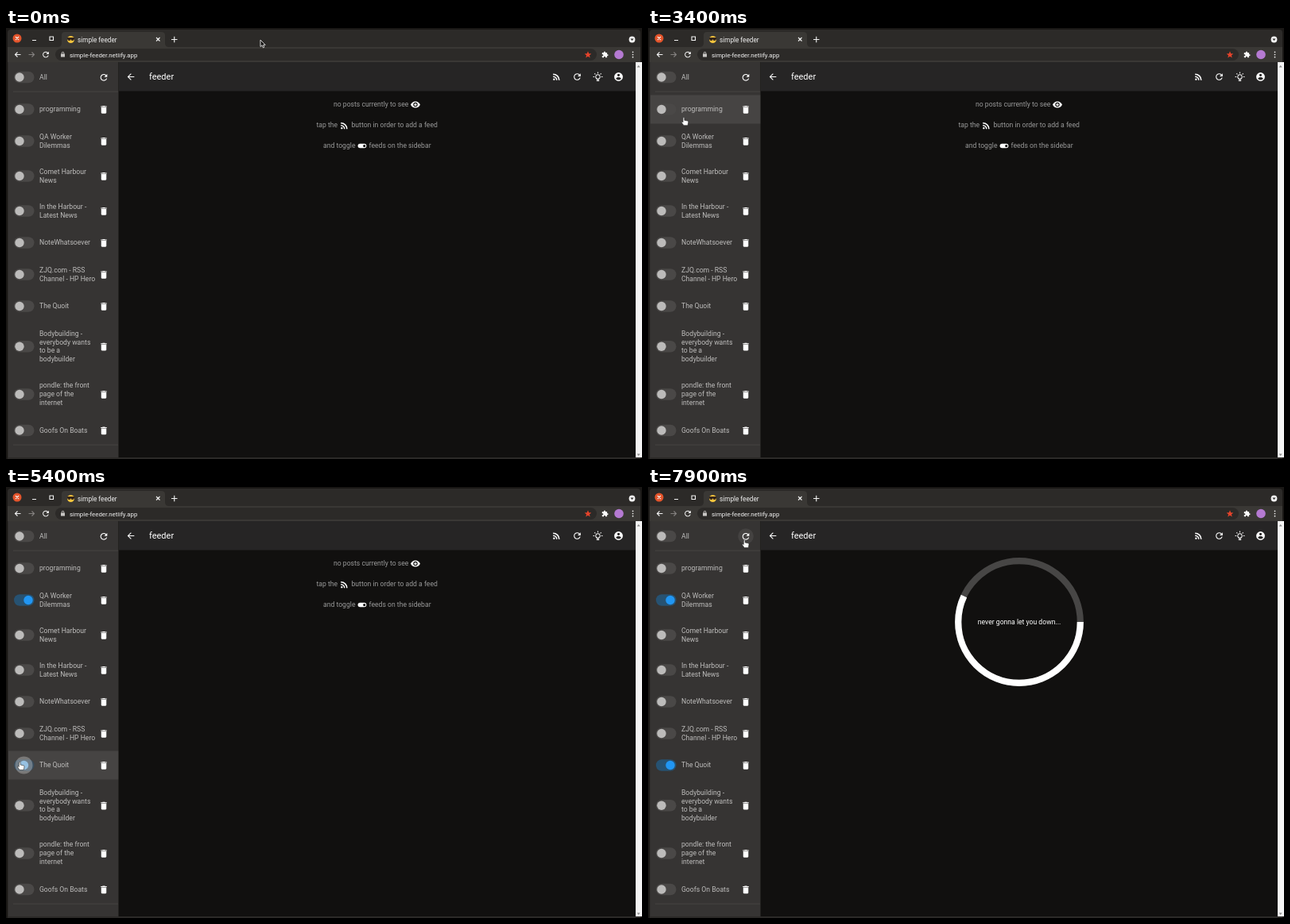
An HTML page that plays this animation: 800 px wide and 543 px high, repeating every 8 s.

```html
<!DOCTYPE html>
<html lang="en">
<head>
<meta charset="utf-8">
<title>simple feeder</title>
<style>
  html, body { margin: 0; width: 100%; height: 100%; overflow: hidden; background: #191715; }
  svg { display: block; width: 100%; height: 100%; }
  text { font: 8.65px Roboto, sans-serif; fill: #bebdbc; }
  #hint text { fill: #999; }
  .line { fill: none; stroke: #f2f2f2; stroke-width: 1.1; }
  .icon { fill: #fff; fill-rule: evenodd; }
</style>
</head>
<body>
<svg id="stage" viewBox="0 0 800 543" preserveAspectRatio="none">
  <defs>
    <path id="back" d="M20 11H7.8l5.6-5.6L12 4l-8 8 8 8 1.4-1.4L7.8 13H20z"/>
    <path id="refresh" d="M17.65 6.35A8 8 0 1 0 19.73 14h-2.08A6 6 0 1 1 16.22 7.78L13 11h7V4z"/>
    <path id="rss" d="M6.2 15.6a2.2 2.2 0 1 1 0 4.4 2.2 2.2 0 0 1 0-4.4M4 4.4A15.6 15.6 0 0 1 19.6 20h-2.9A12.7 12.7 0 0 0 4 7.3zM4 10.1a9.9 9.9 0 0 1 9.9 9.9h-2.8A7.1 7.1 0 0 0 4 12.9z"/>
    <path id="account" d="M12 2a10 10 0 1 0 0 20 10 10 0 0 0 0-20zm0 3a3 3 0 1 1 0 6 3 3 0 0 1 0-6zm0 14.2c-2.5 0-4.7-1.3-6-3.2 0-2 4-3.1 6-3.1s6 1.1 6 3.1c-1.3 1.9-3.5 3.2-6 3.2z"/>
    <path id="trash" d="M6 19c0 1.1.9 2 2 2h8c1.1 0 2-.9 2-2V7H6zM19 4h-3.5l-1-1h-5l-1 1H5v2h14z"/>
    <path id="eye" d="M12 4.5C7 4.5 2.7 7.6 1 12c1.7 4.4 6 7.5 11 7.5s9.3-3.1 11-7.5c-1.7-4.4-6-7.5-11-7.5zM12 17a5 5 0 1 1 0-10 5 5 0 0 1 0 10zm0-8a3 3 0 1 0 0 6 3 3 0 0 0 0-6z"/>
    <path id="switch" d="M17 7H7a5 5 0 0 0 0 10h10a5 5 0 0 0 0-10zm0 8a3 3 0 1 1 0-6 3 3 0 0 1 0 6z"/>
    <path id="bulb" d="M12 6a6 6 0 0 0-3 11.2V19h6v-1.8A6 6 0 0 0 12 6zm0 2a4 4 0 0 1 1 7.9V17h-2v-1.1A4 4 0 0 1 12 8zM9 20h6v2H9zM11 1h2v3h-2zM1 11h3v2H1zM20 11h3v2h-3zM3.5 4.9l1.4-1.4L7 5.6 5.6 7zM17 5.6l2.1-2.1 1.4 1.4L18.4 7z"/>
    <path id="puzzle" d="M20.5 11H19V7a2 2 0 0 0-2-2h-4V3.5a2.5 2.5 0 0 0-5 0V5H4a2 2 0 0 0-2 2v4h1.500a2.700 2.700 0 0 1 0 5.400H2V20a2 2 0 0 0 2 2h4v-1.500a2.700 2.700 0 0 1 5.400 0V22H17a2 2 0 0 0 2-2v-4h1.500a2.500 2.500 0 0 0 0-5z"/>
  </defs>

  <!-- browser window -->
  <path fill="#2c2a28" d="M2 543V6q0-4 4-4h788q4 0 4 4v537z"/>
  <path fill="#3a3835" d="M2 24h63q5 0 5-5V9q0-4 4-4h121q5 0 5 4v10q0 5 5 5h593v19H2z"/>
  <rect x="62" y="26" width="681" height="15" rx="7.5" fill="#2c2a28"/>
  <circle cx="14" cy="13" r="5.5" fill="#e3542b"/>
  <path class="line" d="M12 11l4 4m0-4l-4 4M33 15.500h5M55 11h4.500v4.500H55zM189 12l4.500 4.500m0-4.500L189 16.500M208 14.500h7.500m-3.750-3.750v7.500"/>
  <circle cx="81.5" cy="14.5" r="4.5" fill="#f5c43d"/>
  <path fill="#33251a" d="M77 12h9v2q-.5 2-2.500 2t-2-2q0 2-2 2T77 14z"/>
  <circle cx="787.5" cy="14.5" r="3.9" fill="#f2f2f2"/>
  <path fill="#2c2a28" d="M785.5 13.500h4l-2 2.500z"/>
  <path class="line" d="M18.5 33.500h-7m3-3l-3 3 3 3"/>
  <path class="line" style="stroke:#858280" d="M28.5 33.500h7m-3-3l3 3-3 3"/>
  <path fill="#c8c6c4" d="M69 32.500h5v4h-5zM69.800 32.500v-1a1.700 1.700 0 0 1 3.400 0v1h-.8v-1a.9.9 0 0 0-1.800 0v1z"/>
  <path fill="#e5432b" d="M732 29.300l1.200 2.900 3.100.2-2.400 2 .8 3.100-2.700-1.700-2.700 1.700.8-3.100-2.400-2 3.100-.2z"/>
  <circle cx="771" cy="33.5" r="5.8" fill="#b57ad2"/>
  <path stroke="#f2f2f2" stroke-width="1.7" stroke-linecap="round" stroke-dasharray="0 3.2" d="M788.5 30.300v6.500"/>
  <text x="90" y="17.5" style="font-size:8.2px;fill:#eee">simple feeder</text>
  <text x="80" y="36.5" style="font-size:7.85px;fill:#f2f2f2">simple-feeder.netlify.app</text>

  <!-- page -->
  <path fill="#11100f" d="M141 43h651v498H141z"/>
  <path fill="#262525" d="M142 43h650v36H142z"/>
  <path fill="#1b1a19" d="M142 79h650v1H142z"/>
  <path fill="#363433" d="M3 43h138.500v498H3z"/>
  <path fill="#f4f4f4" d="M792 43h8v498h-8z"/>
  <path fill="#888" d="M793.7 49.500h4l-2-2.500zM793.700 536.500h4l-2 2.500z"/>
  <path fill="#4b4947" d="M9 79.700h132v.8H9zM9 524.700h132v.8H9z"/>
  <text x="180" y="65.2" style="font-size:11px;fill:#fff">feeder</text>
  <g id="icons"></g>
  <g id="rows"></g>
  <circle id="halo" fill="#fff"/>

  <g id="hint">
    <text x="412" y="99">no posts currently to see</text>
    <text x="390.5" y="125">tap the</text>
    <text x="434.5" y="125">button in order to add a feed</text>
    <text x="399" y="151.3">and toggle</text>
    <text x="456.5" y="151.3">feeds on the sidebar</text>
  </g>
  <g id="loader" fill="none" stroke-width="8.2">
    <circle cx="467" cy="170" r="76.8" stroke="#474645"/>
    <circle id="progress" cx="467" cy="170" r="76.8" stroke="#fff" pathLength="100"/>
    <text x="467" y="173" text-anchor="middle" stroke="none" style="fill:#fff">never gonna let you down...</text>
  </g>

  <path id="arrow" fill="#161514" stroke="#e4e4e4" stroke-width=".9" d="M0 0v8.500l2-1.700 1.400 3 1.500-.7-1.400-2.800h2.700z"/>
  <path id="hand" fill="#fff" stroke="#222" stroke-width=".6" d="M-.7 1q.9-1.500 1.800 0v3l4 .8q1 .3.900 1.400l-.7 4.300H.2L-2.500 6.800q-.4-1.300.8-1l1 .8z"/>
</svg>
<script>
const SVG = 'http://www.w3.org/2000/svg';
const $ = id => document.getElementById(id);

function set(node, attrs) {
  for (const key in attrs) node.setAttribute(key, attrs[key]);
}
function add(parent, tag, attrs, label) {
  const node = document.createElementNS(SVG, tag);
  set(node, attrs);
  if (label) node.textContent = label;
  return parent.appendChild(node);
}
function icon(parent, name, x, y, size = 13) {
  add(parent, 'use', { href: '#' + name, class: 'icon',
    transform: `translate(${x - size / 2} ${y - size / 2}) scale(${size / 24})` });
}

icon($('icons'), 'refresh', 50, 33.5, 11.5);
icon($('icons'), 'puzzle', 753.5, 33.5, 9);
icon($('icons'), 'back', 157, 61.5);
['rss', 'refresh', 'bulb', 'account'].forEach((name, i) =>
  icon($('icons'), name, 692.5 + i * 26, 61.5));
icon($('hint'), 'eye', 515, 96.5);
icon($('hint'), 'rss', 425.5, 123);
icon($('hint'), 'switch', 448, 148.5);

const feeds = [
  'programming', 'QA Worker|Dilemmas', 'Comet Harbour|News', 'In the Harbour -|Latest News',
  'NoteWhatsoever', 'ZJQ.com - RSS|Channel - HP Hero', 'The Quoit',
  'Bodybuilding -|everybody wants|to be a|bodybuilder',
  'pondle: the front|page of the|internet', 'Goofs On Boats'
];
const rows = [];

function addRow(label, y, height, action) {
  const lines = label.split('|');
  const cy = y + height / 2;
  const group = $('rows');
  const shade = add(group, 'rect', { x: 3, y, width: 138.5, height, fill: '#fff' });
  const track = add(group, 'rect', { x: 10, y: cy - 7.3, width: 25.5, height: 14.6, rx: 7.3 });
  const knob = add(group, 'circle', { cy, r: 5.7 });
  lines.forEach((line, i) =>
    add(group, 'text', { x: 42, y: cy + 2.7 + (i - (lines.length - 1) / 2) * 10.9 }, line));
  icon(group, action, 123, cy + 0.3);
  rows.push({ shade, track, knob, cy });
}

addRow('All', 44, 36, 'refresh');
let rowTop = 84.5;
for (const label of feeds) {
  const height = [36, 44, 55, 65.5][label.split('|').length - 1];
  addRow(label, rowTop, height, 'trash');
  rowTop += height;
}

const mix = (a, b, k) => a + (b - a) * k;
const blend = (a, b, k) => `rgb(${a.map((v, i) => Math.round(mix(v, b[i], k)))})`;
function ramp(t, start, length) {
  const k = Math.max(0, Math.min(1, (t - start) / length));
  return k * k * (3 - 2 * k);
}

// time, x, y of the pointer tip
const route = [
  [1900, 320, 15], [2700, 49, 112], [2900, 47, 110], [3300, 47, 110], [3900, 16.5, 140.5],
  [4300, 16.5, 140.5], [4700, 55.5, 312], [5100, 17, 346], [5550, 17, 346],
  [6000, 92, 166], [6600, 121, 66]
];
// row, pointer enters, pointer leaves
const hovers = [[1, 2500, 3500], [2, 3600, 4300], [6, 4700, 4800], [7, 4900, 5600], [3, 5900, 6100]];
const switchedAt = { 2: 4000, 7: 5250 };

function pointer(t) {
  const next = route.findIndex(point => point[0] > t);
  if (next < 1) return route.at(next).slice(1);
  const [[t0, x0, y0], [t1, x1, y1]] = route.slice(next - 1, next + 1);
  const k = ramp(t, t0, t1 - t0);
  return [mix(x0, x1, k), mix(y0, y1, k)];
}

const switchState = (row, t) => row in switchedAt ? ramp(t, switchedAt[row], 300) : 0;

function drawHalo(t) {
  const onRefresh = t >= 6500;
  const row = onRefresh ? 0 : t < 4600 ? 2 : 7;
  const click = onRefresh ? 6900 : switchedAt[row] - 100;
  const ripple = ramp(t, click - 100, 200) * (1 - ramp(t, click + 300, 300));
  const hover = onRefresh ? 0.07 * ramp(t, 6500, 200) : 0;
  set($('halo'), {
    cx: onRefresh ? 123 : mix(17, 28, switchState(row, t)),
    cy: rows[row].cy,
    r: onRefresh ? 9.8 : 11,
    opacity: hover + ripple * 0.28
  });
}

function draw(t) {
  rows.forEach(({ shade, track, knob }, i) => {
    const on = switchState(i, t);
    const shown = hovers.filter(([row]) => row === i)
      .reduce((sum, [, enter, leave]) => sum + ramp(t, enter, 200) - ramp(t, leave, 250), 0);
    set(shade, { opacity: 0.08 * shown });
    set(track, { fill: blend([74, 72, 71], [39, 82, 114], on) });
    set(knob, { cx: mix(17, 28, on), fill: blend([188, 187, 186], [33, 150, 243], on) });
  });
  drawHalo(t);

  const loading = t >= 7300;
  $('hint').style.display = loading ? 'none' : '';
  $('loader').style.display = loading ? '' : 'none';
  set($('progress'), { 'stroke-dasharray': `${100 * ramp(t, 7572, 600)} 200` });

  const [x, y] = pointer(t);
  const onLink = x < 141 && y > 44;
  for (const [id, visible] of [['arrow', !onLink], ['hand', onLink]]) {
    $(id).style.display = visible ? '' : 'none';
    set($(id), { transform: `translate(${x} ${y})` });
  }
}

// the picture advances ten times a second
function tick() {
  draw(Math.floor(performance.now() % 8000 / 100) * 100);
  requestAnimationFrame(tick);
}
tick();
</script>
</body>
</html>
```
